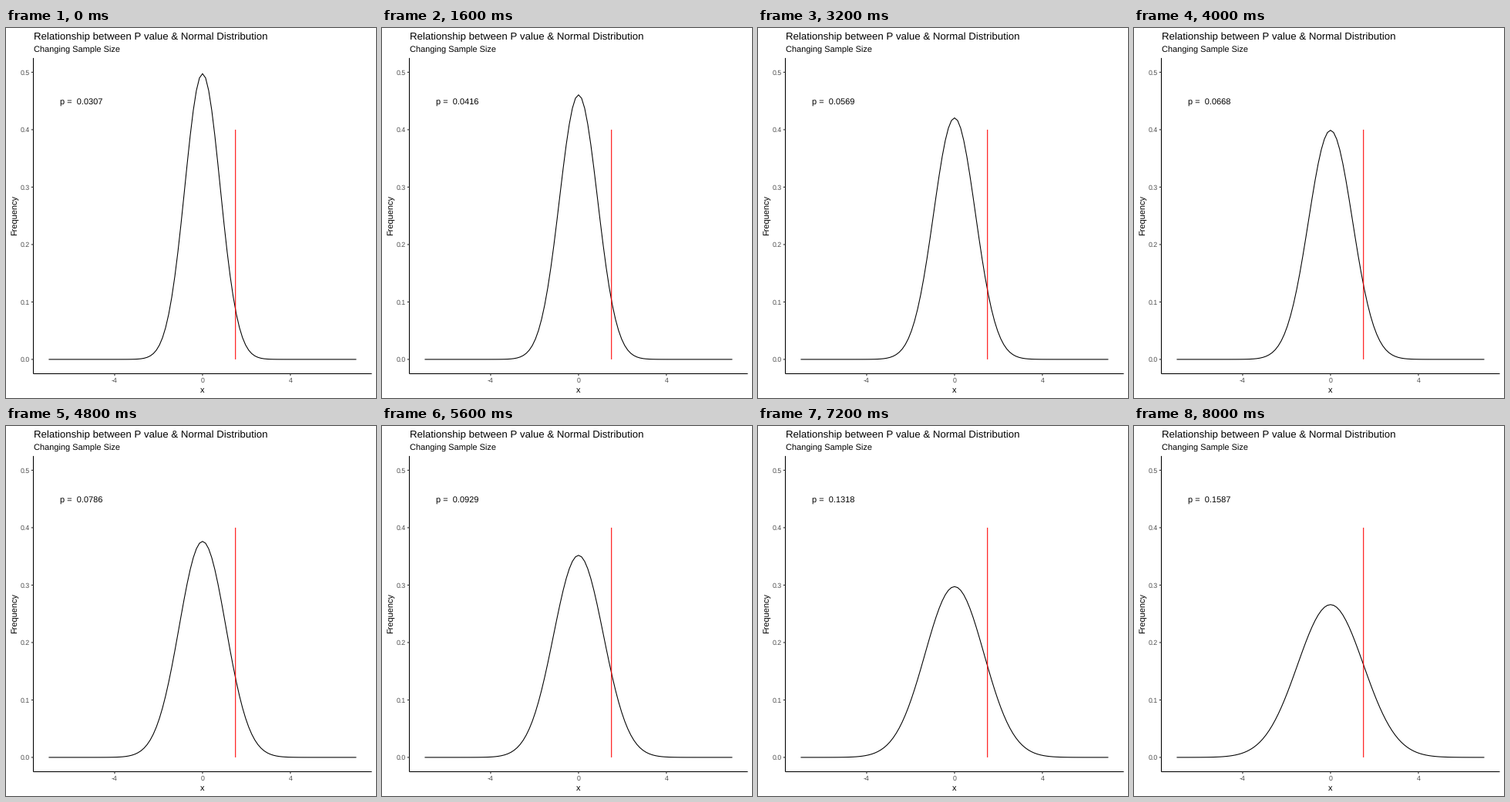
Animation of 480x480 px, one loop 8800 ms. Source, as a matplotlib script:

```python
import math

import matplotlib.pyplot as plt
import numpy as np
from matplotlib.animation import FuncAnimation

SIZE, DPI = 480, 72
FRAMES, INTERVAL = 11, 800
LEFT, RIGHT, TOP, BOTTOM = 35.5, 474.5, 38.9, 448.5
LINE = 1.07
SIGMA, CUTOFF, N_START = 3, 1.5, 14

plt.rcParams.update({
    "font.family": "Liberation Sans",
    "text.hinting": "none",
    "text.hinting_factor": 8,
    "text.kerning_factor": 6,
    "toolbar": "None",
})

fig = plt.figure(figsize=(SIZE / DPI, SIZE / DPI), dpi=DPI, facecolor="white")
ax = fig.add_axes([0, 0, 1, 1])
ax.set(xlim=(0, SIZE), ylim=(SIZE, 0))
ax.axis("off")


def px(x):
    return 254.95 + 28.5 * x


def py(y):
    return 429.9 - 745 * y


def line(xs, ys, color="black"):
    return ax.plot(xs, ys, color=color, lw=LINE, snap=False,
                   solid_capstyle="butt", solid_joinstyle="round")[0]


def label(x, y, text, size, ha="left", color="black", **kw):
    return ax.text(x, y, text, fontsize=size, ha=ha, va="baseline",
                   color=color, **kw)


# Axes and ticks
line([LEFT, LEFT], [TOP, BOTTOM])
line([LEFT, RIGHT], [BOTTOM, BOTTOM])
for v in np.arange(6) / 10:
    line([LEFT - 2.75, LEFT], [py(v)] * 2, "#333333")
    label(30.4, py(v) + 3.2, f"{v:.1f}", 8.8, "right", "#4d4d4d")
for v in (-4, 0, 4):
    line([px(v)] * 2, [BOTTOM, BOTTOM + 2.75], "#333333")
    label(px(v), 460, str(v), 8.8, "center", "#4d4d4d")

# Titles
label(LEFT, 15, "Relationship between P value & Normal Distribution", 13.2)
label(LEFT, 32, "Changing Sample Size", 11)
label(px(0), 473, "x", 11, "center")
label(13.4, 243, "Frequency", 11, "center", rotation=90,
      rotation_mode="anchor")

# Curve, cutoff and p value
x = np.linspace(-7, 7, 101)
curve = line(px(x), py(0 * x))
line([px(CUTOFF)] * 2, [py(0), py(0.4)], "red")
p_text = label(px(-5.5), 99, "", 11.04, "center")


def update(i):
    sd = SIGMA / math.sqrt(N_START - i)
    density = np.exp(-0.5 * (x / sd) ** 2) / (sd * math.sqrt(2 * math.pi))
    p = 0.5 * math.erfc(CUTOFF / sd / math.sqrt(2))
    curve.set_ydata(py(density))
    p_text.set_text(f"p =  {p:.4f}")
    return curve, p_text


anim = FuncAnimation(fig, update, frames=FRAMES, interval=INTERVAL,
                     repeat=True, repeat_delay=0)
plt.show()
```
